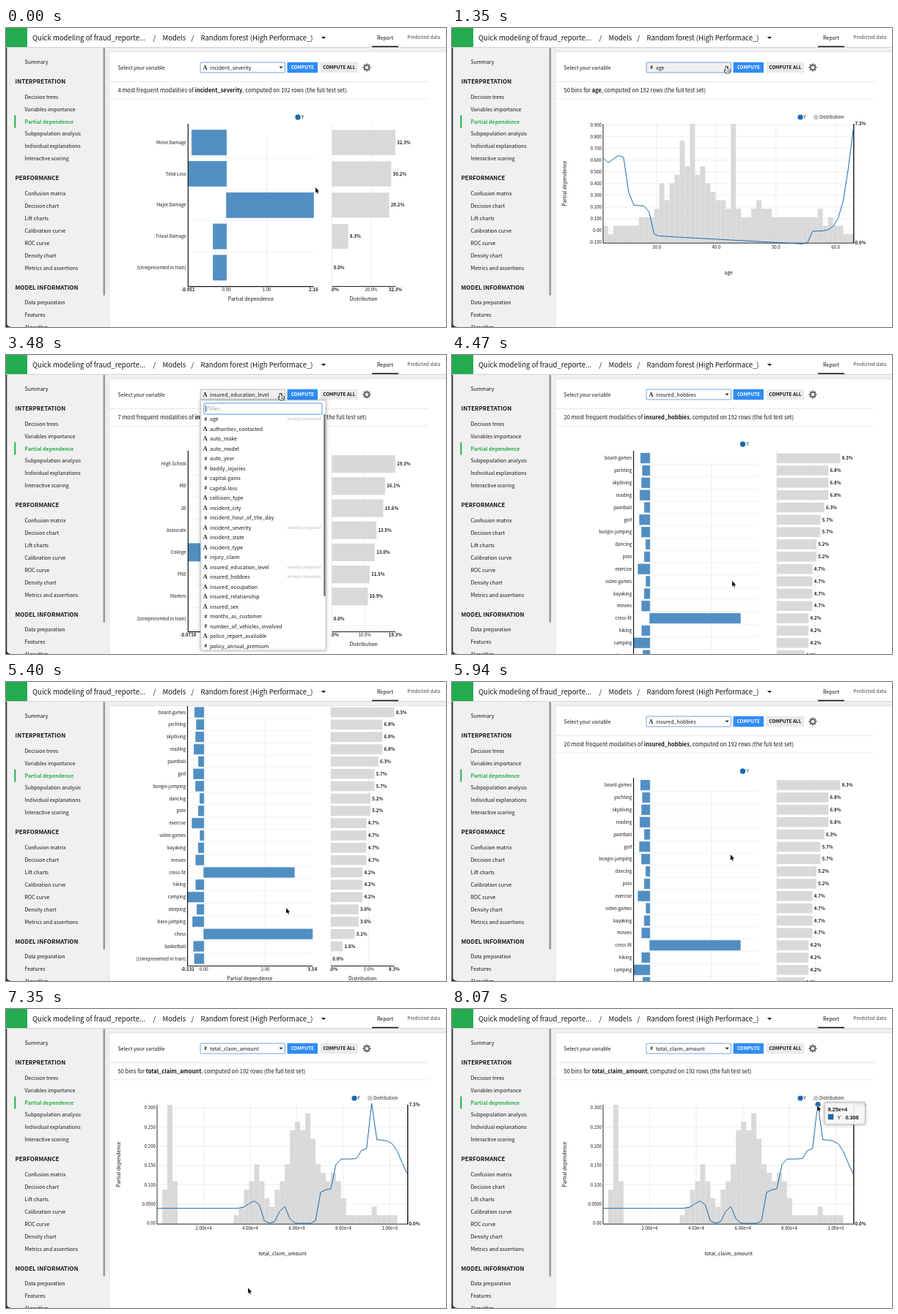
Animation, 600 px wide and 409 px high, one loop 8100 ms. Source, as an HTML page with a canvas:

```html
<!DOCTYPE html>
<html lang="en">
<head>
<meta charset="utf-8">
<title>Partial dependence</title>
<style>
html, body { margin: 0; width: 100%; height: 100%; overflow: hidden; background: #fff; }
canvas { display: block; width: 600px; height: 409px; }
</style>
</head>
<body>
<canvas id="stage"></canvas>
<script>
const canvas = document.getElementById('stage');
const c = canvas.getContext('2d');
const ratio = window.devicePixelRatio || 1;
canvas.width = 600 * ratio;
canvas.height = 409 * ratio;

const LOOP = 8100;
const SANS = '"Noto Sans CJK JP", "Noto Sans CJK SC", "Noto Sans CJK", "Open Sans", sans-serif';
const ARIAL = '"Liberation Sans", Arial, sans-serif';
const BLUE = '#1a69ad', LIGHT_BLUE = '#518fc3', GREY = '#d9d9d9', GRID = '#e6e6e6', INK = '#151515';

// ---- maths ----
const bump = (x, centre, width) => Math.exp(-(((x - centre) / width) ** 2));
const rise = (x, centre, width = 0.2) => 1 / (1 + Math.exp((centre - x) / width));
const random = seed => Math.abs(Math.sin(seed * 12.9898) * 43758.5453) % 1;
const number = v => Math.abs(v) < 1e-9 ? '0.00' : v.toPrecision(3);
const percent = count => (count / 1.92).toFixed(1) + '%';

function ease(t, a, b) {
  const u = Math.min(1, Math.max(0, (t - a) / (b - a)));
  return u * u * (3 - 2 * u);
}

// ---- drawing helpers ----
function rect(x, y, w, h, fill) {
  c.fillStyle = fill;
  c.fillRect(x, y, w, h);
}

function box(x, y, w, h, r, fill, stroke, lw = 0.8) {
  c.beginPath();
  c.roundRect(x, y, w, h, r);
  if (fill) { c.fillStyle = fill; c.fill(); }
  if (stroke) { c.strokeStyle = stroke; c.lineWidth = lw; c.stroke(); }
}

function dot(x, y, r, fill) {
  c.fillStyle = fill;
  c.beginPath();
  c.arc(x, y, r, 0, 7);
  c.fill();
}

function line(points, color = GRID, lw = 0.7) {
  c.strokeStyle = color;
  c.lineWidth = lw;
  c.lineJoin = 'round';
  c.beginPath();
  for (let i = 0; i < points.length; i += 2) c.lineTo(points[i], points[i + 1]);
  c.stroke();
}

function shape(points, fill, stroke, lw) {
  line([...points, points[0], points[1]], stroke || fill, stroke ? lw : 0.1);
  c.fillStyle = fill;
  c.fill();
}

function shadowBox(x, y, w, h, r, fill, stroke) {
  c.save();
  c.shadowColor = 'rgba(0,0,0,.28)';
  c.shadowBlur = 4 * ratio;
  box(x, y, w, h, r, fill, stroke, 0.7);
  c.restore();
}

// Text centred vertically on y; small sizes use a medium weight. Returns the width.
function text(s, x, y, size, { bold = false, color = INK, align = 'left', font = SANS } = {}) {
  c.font = `${bold ? 700 : size < 7.2 ? 500 : 400} ${size}px ${font}`;
  c.textAlign = align;
  c.fillStyle = color;
  c.fillText(s, x, y + size * 0.36);
  return c.measureText(s).width;
}

const middle = { align: 'center' }, boldMiddle = { align: 'center', bold: true };
const arrowDown = (x, y, w) => shape([x - w, y - w / 2, x + w, y - w / 2, x, y + w / 2], INK);

// ---- data ----
// Each row is "label:count:effect"; a missing effect gets a small negative one.
function rows(list) {
  return list.split(', ').map((row, i) => {
    const [label, count, effect] = row.split(':');
    return { label, count: +count, effect: +(effect || -0.12 - 0.32 * random(i + 3)) };
  });
}

const severity = {
  name: 'incident_severity', icon: 'A', step: 42.8, ticks: [0, 1], distTick: 20,
  rows: rows('Minor Damage:62:-.86, Total Loss:58:-.951, Major Damage:56:2.16, Trivial Damage:16:-.33, ' +
    '[Unrepresented in train]:0:-.33')
};
const education = {
  name: 'insured_education_level', icon: 'A', step: 30.2, ticks: [-0.05, 0], distTick: 10,
  rows: rows('High School:37:-.016, MD:31:-.005, JD:30:-.045, Associate:26:-.038, College:25:-.071, ' +
    'PhD:22:.0347, Masters:21:.0008, [Unrepresented in train]:0:-.045')
};
const hobbies = {
  name: 'insured_hobbies', icon: 'A', step: 16.85, ticks: [0, 2], distTick: 5, shift: 1.5,
  rows: rows('board-games:16, yachting:13, skydiving:13, reading:13, paintball:12, golf:11, bungie-jumping:11, ' +
    'dancing:10, polo:10, exercise:9, video-games:9, kayaking:9, movies:9, cross-fit:8:2.95, hiking:8, ' +
    'camping:8:-.531, sleeping:7, base-jumping:7, chess:6:3.54, basketball:3, [Unrepresented in train]:0')
};

// Curves and histograms are functions of the bin number.
const BINS = 49;
const age = {
  name: 'age', icon: '#', x: [21, 63], xStep: 10, xLabel: number,
  y: [-0.1, 0.9], yStep: 0.1, yTop: 132.5,
  curve(i) {
    const a = 21 + 42 * i / BINS;
    return 0.65 - 0.42 * rise(a, 25.08) - 0.25 * rise(a, 29) - 0.07 * bump(a, 21.9, 1)
      - 0.0028 * (a - 21) + 0.115 * rise(a, 55.6, 0.15) + 0.9 * Math.exp(-(((63 - a) / 1.5) ** 1.3));
  },
  count: i => 1.5 + 8 * bump(i, 16, 6.5) + 3.5 * bump(i, 31, 2.5) + 2 * bump(i, 40, 4)
    + 5 * bump(i, 17, 0.6) + 11 * bump(i, 25, 0.6)
};
const claim = {
  name: 'total_claim_amount', icon: '#', x: [0, 107600], xStep: 20000, xLabel: v => v.toExponential(2),
  y: [0, 0.3], yStep: 0.05, yTop: 135,
  curve: i => 0.039 * rise(20.5, i) + 0.019 * bump(i, 19, 1.5) + 0.047 * bump(i, 24.7, 1.1)
    + 0.087 * rise(i, 31.5) + 0.08 * rise(i, 34.7) + 0.025 * rise(i, 39.6) + 0.025 * rise(i, 42.5)
    + 0.117 * bump(i, 42, 0.5) - 0.11 * rise(i, 47.8, 0.8),
  count: i => 14 * bump(i, 2, 1) + 6 * bump(i, 18.5, 2.4) + 11 * bump(i, 28, 4.3) + 4 * bump(i, 34, 2.2)
    + 1.5 * bump(i, 42, 5)
};

const variables = ('#age A:authorities_contacted A:auto_make A:auto_model #auto_year #bodily_injuries #capital-gains ' +
  '#capital-loss A:collision_type A:incident_city #incident_hour_of_the_day A:incident_severity A:incident_state ' +
  'A:incident_type #injury_claim A:insured_education_level A:insured_hobbies A:insured_occupation ' +
  'A:insured_relationship A:insured_sex #months_as_customer #number_of_vehicles_involved ' +
  'A:police_report_available #policy_annual_premium A:policy_csl #policy_deductable A:policy_state ' +
  '#property_claim A:property_damage #total_claim_amount #umbrella_limit')
  .split(' ').map(s => ({ icon: s[0], name: s.replace(/^(#|A:)/, '') }));
const computed = [severity, education, hobbies, age, claim].map(v => v.name);

// ---- timeline ----
const ROW = 13.5, SCROLL = 7 * ROW;
const picks = [
  { open: 300, pick: 600, view: age },
  { open: 1380, pick: 1770, view: education },
  { open: 3420, pick: 3780, view: hobbies },
  { open: 6150, pick: 7020, view: claim, scroll: SCROLL }
];
const listScroll = t => SCROLL * ease(t, 6420, 6690);
const pageScroll = t => 99.7 * (ease(t, 4560, 5100) - ease(t, 5520, 5850));

// Pointer stops: arrival time and place; every pick adds the field and the list row.
const stops = [[0, 422, 218], [2080, 395, 297], [2340, 457, 287], [4080, 382, 309], [6340, 377, 265], [7930, 498, 132]];
for (const { open, pick, view, scroll = 0 } of picks) {
  const row = variables.findIndex(v => v.name === view.name);
  stops.push([open - 60, 374, 53], [pick - 60, 330, 84.5 + ROW * row - scroll]);
}
stops.sort((a, b) => a[0] - b[0]);

function pointer(t) {
  let [, x, y] = stops[0];
  for (const [at, sx, sy] of stops) {
    const u = ease(t, at - 230, at);
    x += (sx - x) * u;
    y += (sy - y) * u;
  }
  return [x, y];
}

// ---- page parts ----
function icon(kind, x, y) {
  if (kind === 'A') text('A', x, y, 8.2, { bold: true, font: '"Liberation Serif", Times, serif' });
  else text('#', x + 1.8, y, 6.4, { bold: true });
}

function sidebar() {
  rect(0, 26, 135, 383, '#f0f0f0');
  text('Summary', 25.5, 46.2, 7);
  const groups = [
    ['INTERPRETATION', 'Decision trees|Variables importance|Partial dependence|Subpopulation analysis|Individual explanations|Interactive scoring'],
    ['PERFORMANCE', 'Confusion matrix|Decision chart|Lift charts|Calibration curve|ROC curve|Density chart|Metrics and assertions'],
    ['MODEL INFORMATION', 'Data preparation|Features|Algorithm']
  ];
  let y = 73;
  for (const [title, items] of groups) {
    text(title, 12.5, y, 8, { bold: true });
    y += 21.2;
    for (const s of items.split('|')) {
      const active = s === 'Partial dependence';
      text(s, 25.5, y, 7, { bold: active, color: active ? '#27ae4f' : INK });
      if (active) rect(11.3, y - 8.5, 2, 17, '#27ae4f');
      y += 16.9;
    }
    y += 9.8;
  }
  box(132.5, 27, 2.6, 339, 1.3, '#999');
  rect(0, 26, 1.3, 383, '#333');
  c.fillStyle = '#333';
  c.beginPath();
  c.moveTo(0, 402);
  c.quadraticCurveTo(1, 409, 8, 409);
  c.lineTo(0, 409);
  c.fill();
}

function header() {
  rect(0, 0, 600, 26, '#fff');
  rect(0, 26, 600, 1, '#d2d2d2');
  rect(0, 0, 29, 26, '#22ab4f');
  text('Quick modeling of fraud_reporte...', 36, 13.2, 9.6);
  text('/', 200.5, 13.2, 9.5);
  text('Models', 213.5, 13.2, 9.5);
  text('/', 252.5, 13.2, 9.5);
  text('Random forest (High Performace_)', 265.5, 13.2, 9.5);
  arrowDown(433, 13.5, 3);
  text('Report', 517, 13, 7, middle);
  text('Predicted data', 547.3, 13, 6.6, { color: '#444' });
  rect(499, 24.6, 36, 1.6, INK);
}

function gear(x, y) {
  c.save();
  c.translate(x, y);
  for (let i = 0; i < 8; i++) {
    c.rotate(Math.PI / 4);
    rect(-1.1, -5.5, 2.2, 3, '#727272');
  }
  c.strokeStyle = '#727272';
  c.lineWidth = 2.1;
  c.beginPath();
  c.arc(0, 0, 3.1, 0, 7);
  c.stroke();
  c.restore();
}

function toolbar(view, open, over) {
  const right = 576 - (view.shift || 0);
  text('Select your variable', 152.5, 54, 7);
  box(265, 47, 115.5, 14, 1, over ? '#f0f0f0' : '#fff', open ? '#aaa' : '#4a90d9');
  icon(view.icon, 268.5, 54);
  text(view.name, 278, 54, 7);
  arrowDown(375, 54, 2.4);
  box(383.5, 46.7, 41.5, 14.5, 1, '#2f8cf5');
  text('COMPUTE', 404.3, 54, 6.4, { ...boldMiddle, color: '#fff' });
  box(428.5, 46.7, 51.5, 14.5, 1, '#eaeaea');
  text('COMPUTE ALL', 454.3, 54, 6.4, boldMiddle);
  gear(492, 54);
  line([141, 73.5, right, 73.5], '#ddd');
  const head = view.rows ? `${view.rows.length - 1} most frequent modalities of ` : '50 bins for ';
  let x = 152.5;
  x += text(head, x, 85, 7.55);
  x += text(view.name, x, 85, 7.55, { bold: true });
  text(', computed on 192 rows (the full test set)', x, 85, 7.55);
  line([141, 96.8, right, 96.8], '#e4e4e4');
}

function barChart({ rows, step, ticks, distTick, shift = 0 }, hot) {
  const top = 131, bottom = top + step * (rows.length + 0.2);
  const left = 248.3 - shift / 2, width = 171.1 - shift / 2, distX = 444.4 - shift, distW = 86.5;
  const effects = rows.map(r => r.effect), lo = Math.min(...effects), hi = Math.max(...effects);
  const px = v => left + width * (v - lo) / (hi - lo);
  const dx = count => distX + distW * count / rows[0].count;

  for (const v of ticks) line([px(v), top + 20, px(v), bottom]);
  for (const v of [0, distTick * 1.92]) line([dx(v), top, dx(v), bottom]);
  dot(398 - shift, 122, 3.7, BLUE);
  text('Y', 403 - shift, 122, 6.2);

  rows.forEach(({ label, count, effect }, i) => {
    const y = top + step * (0.6 + i), h = step * 0.8, end = dx(count);
    if (i) line([left, y - step / 2, left + width, y - step / 2], '#eee');
    text(label, 245.5 - shift / 4, y, 6, { align: 'right' });
    box(px(Math.min(0, effect)), y - h / 2, px(Math.abs(effect)) - px(0), h, 0, i === hot ? BLUE : LIGHT_BLUE, '#3f82bb', 0.6);
    rect(distX, y - h / 2, end - distX, h, GREY);
    text(percent(count), end + 2.3, y, 6, { bold: true });
  });

  line([left, top, left, bottom, left + width, bottom], INK, 1.2);
  line([distX, bottom, distX + distW, bottom], INK, 1);
  const ty = bottom + 4.2;
  for (const v of ticks) text(number(v), px(v), ty, 6, middle);
  for (const v of [lo, hi]) text(number(v), px(v), ty, 6, boldMiddle);
  text('.0%', distX - 2, ty, 6, { bold: true });
  text(distTick.toFixed(1) + '%', dx(distTick * 1.92), ty, 6, middle);
  text(percent(rows[0].count), distX + distW, ty, 6, boldMiddle);
  text('Partial dependence', 334 - shift, bottom + 16.7, 6.9, middle);
  text('Distribution', 487.7 - shift, bottom + 16.7, 6.9, middle);
}

function lineChart(view) {
  const left = 206, right = 547.5, top = 131, bottom = 293.7, w = (right - left) / BINS;
  const [x0, x1] = view.x, [y0, y1] = view.y;
  const px = v => left + (right - left) * (v - x0) / (x1 - x0);
  const py = v => 293.2 + (view.yTop - 293.2) * (v - y0) / (y1 - y0);

  for (let v = y0; v < y1 + 0.01; v += view.yStep) {
    line([left, py(v), right, py(v)]);
    text(number(v), 204, py(v), 6.1, { align: 'right' });
  }
  for (let v = Math.ceil((x0 + 1) / view.xStep) * view.xStep; v < x1; v += view.xStep) {
    line([px(v), top, px(v), bottom]);
    text(view.xLabel(v), px(v), 300.3, 6.1, middle);
  }
  const curve = [];
  for (let i = 0; i <= BINS; i++) {
    const count = Math.min(14, Math.round(view.count(i) * (0.72 + 0.56 * random(i + 1))));
    if (i < BINS) rect(left + w * i, bottom - count * 11.62, w, count * 11.62, GREY);
    curve.push(left + w * i, py(view.curve(i)));
  }
  line([left, top, left, bottom + 0.5, right, bottom + 0.5], INK, 0.9);
  line([right + 0.3, top, right + 0.3, bottom + 1], INK, 1.4);
  line(curve, BLUE, 1);
  text('7.3%', 549.5, 130.5, 6.1, { bold: true });
  text('0.0%', 549.5, 294.3, 6.1, { bold: true });
  dot(475, 122, 3.6, BLUE);
  text('Y', 479.3, 122, 6.2);
  dot(496.3, 122, 3.6, '#ccc');
  text('Distribution', 501, 122, 6);
  text(view.name, 377, 335, 6.9, middle);
  c.save();
  c.translate(153.5, 212.5);
  c.rotate(-Math.PI / 2);
  text('Partial dependence', 0, 0, 6.9, middle);
  c.restore();
}

function tooltip(x, y, w, title, value) {
  shadowBox(x, y, w, 30, 2, 'rgba(255,255,255,.88)', '#aaa');
  text(title, x + 4.5, y + 9.2, 7.3, { bold: true, font: ARIAL });
  box(x + 5, y + 16, 7, 7, 0, BLUE, '#555', 0.5);
  text('Y', x + 17.5, y + 20, 7, { font: ARIAL });
  text(value, x + w - 9, y + 20, 7.2, { bold: true, font: ARIAL, align: 'right' });
}

function menu(t, y) {
  const scroll = listScroll(t);
  // The highlight follows the pointer only when the pointer itself moves.
  const hot = y > 78 ? Math.floor((y - 77.3 + (t < 6780 ? 0 : scroll)) / ROW) : -1;
  shadowBox(265.3, 62, 171, 342, 1, '#fff', '#bbb');
  c.save();
  c.beginPath();
  c.rect(265.6, 81.5, 170.4, 322);
  c.clip();
  variables.forEach((v, i) => {
    const iy = 87.5 + ROW * i - scroll;
    if (i === hot) rect(265.6, iy - ROW / 2, 170.4, ROW, '#f0f0f0');
    icon(v.icon, 268.7, iy);
    text(v.name, 278, iy, 7);
    if (computed.includes(v.name)) text('already computed', 429, iy, 5.4, { color: '#b5b5b5', align: 'right' });
  });
  c.restore();
  box(433.2, 81 + scroll * 0.765, 2.4, 249, 1.2, '#777');
  box(270, 66, 161, 15, 1, '#fff', '#4a9af0', 1);
  text('Filter...', 274, 73.5, 7, { color: '#999' });
  line([272.6, 69, 272.6, 78], INK, 0.8);
}

function cursor(x, y, hand) {
  c.save();
  c.translate(x, y);
  c.scale(0.9, 0.9);
  if (hand) {
    shape([-.9, .3, .2, -.3, 1, .3, 1.2, 3.2, 4.6, 3.8, 5.6, 5, 5.2, 7.6, 4.4, 9.4, -.2, 9.4, -2.6, 6.2, -2.5, 5.2, -.7, 6],
      '#fff', '#111', 1.7);
    for (const lx of [1.4, 2.7, 4]) line([lx, 5.5, lx, 8], '#222', 0.6);
  } else {
    shape([0, 0, 0, 8.4, 1.9, 6.7, 3.2, 9.6, 4.5, 9, 3.3, 6.2, 5.8, 6], '#111', '#fff', 1.2);
  }
  c.restore();
}

function draw(t) {
  const view = picks.reduce((shown, p) => t >= p.pick ? p.view : shown, severity);
  const open = picks.some(p => t >= p.open && t < p.pick);
  const [x, y] = pointer(t);
  const over = y < 62 && x > 265 && x < 381;
  const onPhD = t >= 2070 && t < 2460;

  c.setTransform(ratio, 0, 0, ratio, 0, 0);
  rect(0, 0, 600, 409, '#f0f0f0');
  box(141, 32.5, 470, 390, 0, '#fff', '#ddd');
  c.save();
  c.beginPath();
  c.rect(141.4, 33, 459, 376);
  c.clip();
  c.translate(0, -pageScroll(t));
  toolbar(view, open, over);
  if (view.rows) barChart(view, onPhD ? 5 : -1);
  else lineChart(view);
  c.restore();
  sidebar();
  header();

  if (onPhD) tooltip(433, 275, 58, 'PhD', '0.0347');
  if (t >= 7890) {
    dot(499, 130.5, 3.6, BLUE);
    tooltip(508, 128, 55.5, '9.25e+4', '0.308');
  }
  if (open) menu(t, y);
  cursor(x, y, open || over);
}

const start = performance.now();
function tick() {
  draw((performance.now() - start) % LOOP);
  requestAnimationFrame(tick);
}
tick();
</script>
</body>
</html>
```
